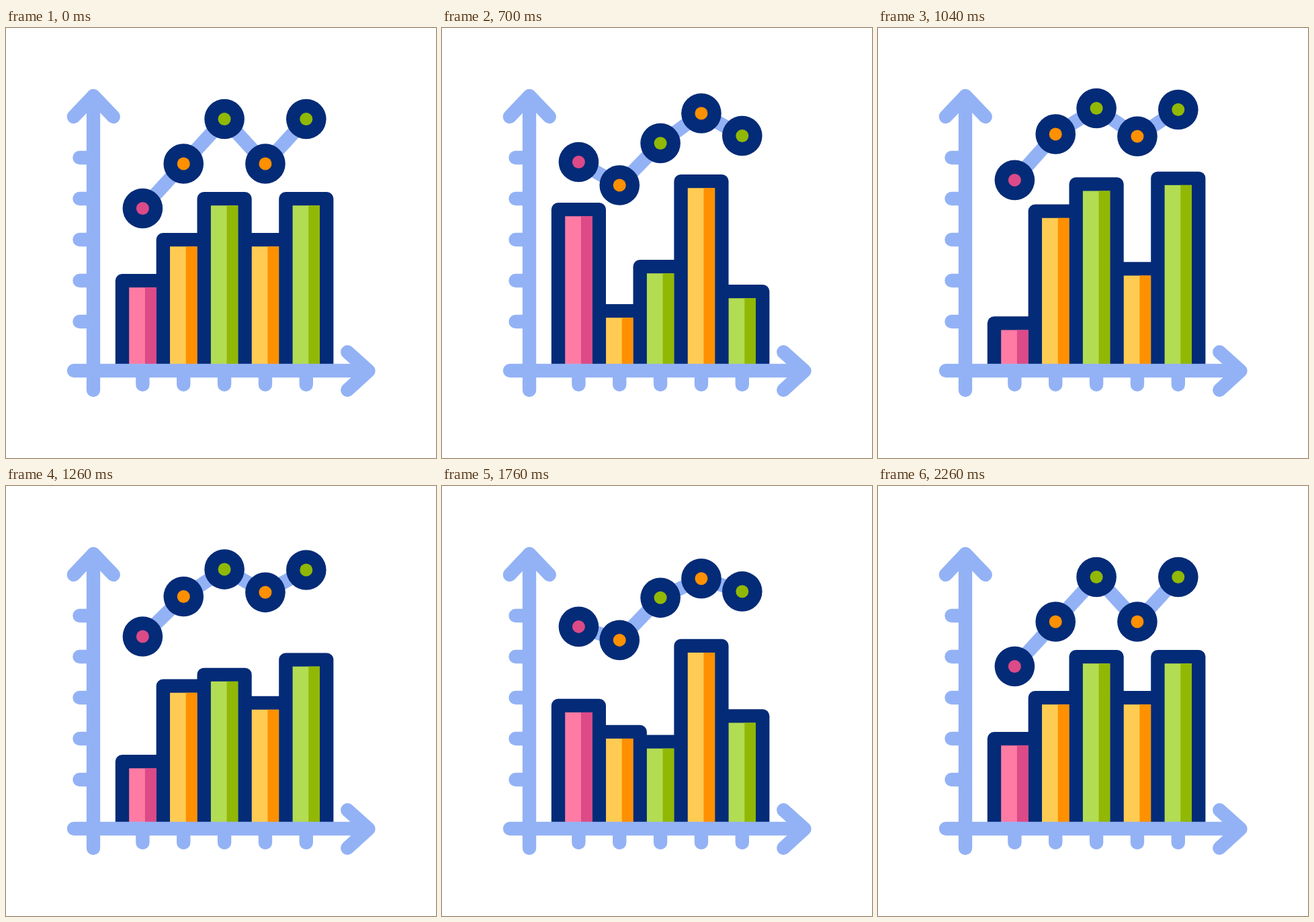
These frames come from a looping animation (640x640 px, 2600 ms). An HTML page:

```html
<!DOCTYPE html>
<html lang="en">
<head>
<meta charset="utf-8">
<title>Chart</title>
<style>
  html, body { margin: 0; width: 100%; height: 100%; overflow: hidden; background: #fff; }
  svg { display: block; width: 100%; height: 100%; }
  .line { fill: none; stroke: #93b2f5; stroke-width: 20.4; stroke-linecap: round; stroke-linejoin: round; }
</style>
</head>
<body>
<svg viewBox="0 0 640 640">
  <g id="bars"></g>
  <path class="line" id="axes"/>
  <polyline class="line" id="trend"/>
  <g id="dots"></g>
</svg>
<script>
const LOOP = 2600, STEP = 20, SEGMENT = 502, BASE = 505;
const NAVY = '#042b77';
// Light and dark tone for each resting level.
const TONES = [['#ff7ba3', '#dc4a88'], ['#ffcb52', '#ff9000'], ['#b2dc52', '#91b805']];
const LEVELS = [0, 1, 2, 1, 2];
const centerX = i => 203.4 + 60.85 * i;

// Poses are offsets from the rest height; each motion starts and ends at rest.
const REST = LEVELS.map(() => 0);
const SWING = [-69, 32, 36, -75, 25];
const barMotion = {
  start: 200,
  rest: level => 366 - 61 * level,
  poses: [REST, [-106, 106, 101, -87, 138], [72, -50, -28, 50, -39], [-67, 69, 172, -105, 120], REST]
};
const dotMotion = {
  start: 226,
  rest: level => 268.5 - 66.5 * level,
  poses: [REST, SWING, [-40, -50, -20, -38, -17], SWING, REST]
};

const easeOut = p => 1 - (1 - p) ** 2.7;

function heightsAt({ start, rest, poses }, t) {
  const last = poses.length - 1;
  const time = Math.min(Math.max((t - start) / SEGMENT, 0), last);
  const k = Math.min(Math.floor(time), last - 1);
  const p = easeOut(time - k);
  return LEVELS.map((level, i) => rest(level) + poses[k][i] * (1 - p) + poses[k + 1][i] * p);
}

function set(el, attrs) {
  for (const name in attrs) el.setAttribute(name, attrs[name]);
  return el;
}
const byId = id => document.getElementById(id);
const add = (parent, tag, attrs) =>
  byId(parent).appendChild(set(document.createElementNS('http://www.w3.org/2000/svg', tag), attrs));

let axes = 'M130 101V539M101 510H539M100.8 132L130.2 101L159.8 132M508.3 482.3L539.5 510.3L508.3 538.8';
LEVELS.forEach((_, i) => axes += `M109.5 ${193 + 61 * i}H130M${centerX(i)} 510V530.7`);
set(byId('axes'), { d: axes });

const frames = LEVELS.map(() => add('bars', 'path', { fill: NAVY }));
const fills = LEVELS.map((level, i) => [
  add('bars', 'rect', { x: centerX(i) - 20.2, width: 40.4, fill: TONES[level][0] }),
  add('bars', 'rect', { x: centerX(i) + 3.5, width: 16.7, fill: TONES[level][1] })
]);
const dots = LEVELS.map((level, i) => [
  add('dots', 'circle', { cx: centerX(i), r: 29.8, fill: NAVY }),
  add('dots', 'circle', { cx: centerX(i), r: 9.5, fill: TONES[level][1] })
]);

function draw(t) {
  heightsAt(barMotion, t).forEach((y, i) => {
    set(frames[i], {
      d: `M${centerX(i) - 40.6} ${BASE}V${y + 10}a10 10 0 0 1 10 -10h61.2a10 10 0 0 1 10 10V${BASE}z`
    });
    fills[i].forEach(rect => set(rect, { y: y + 20.2, height: BASE - y - 20.2 }));
  });
  const heights = heightsAt(dotMotion, t);
  set(byId('trend'), { points: heights.map((y, i) => `${centerX(i)},${y}`).join(' ') });
  heights.forEach((cy, i) => dots[i].forEach(dot => set(dot, { cy })));
}

const start = performance.now();
function tick() {
  const t = (performance.now() - start) % LOOP;
  draw(Math.floor(t / STEP) * STEP);
  requestAnimationFrame(tick);
}
tick();
</script>
</body>
</html>
```
